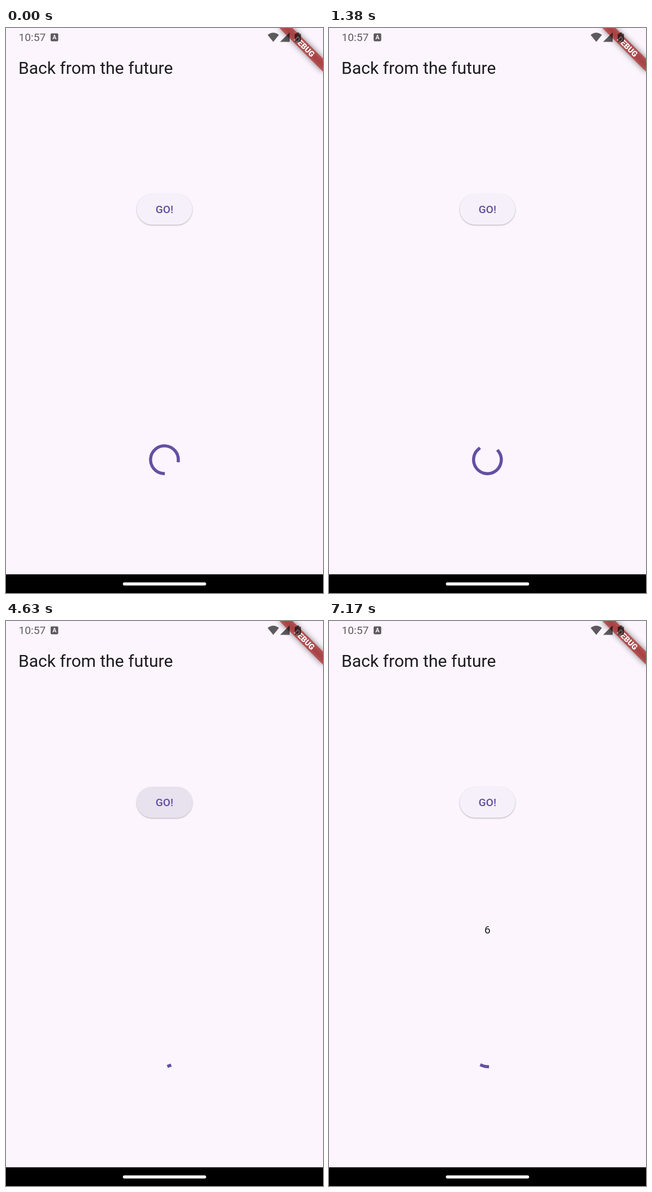
An HTML page for the animation above (7.21 s loop, 561 by 998 pixels).

```html
<!DOCTYPE html>
<html lang="en">
<head>
<meta charset="utf-8">
<title>Back from the future</title>
<style>
  html, body { margin: 0; width: 100%; height: 100%; overflow: hidden; background: #fcf5fd; }
  svg { display: block; width: 100%; height: 100%; font-family: Roboto, sans-serif; }
  #button { filter: drop-shadow(0 1.4px 1.2px rgba(0, 0, 0, .3)); }
  #shade { filter: blur(5.4px); }
</style>
</head>
<body>
<svg viewBox="0 0 561 998">
  <rect width="561" height="998" fill="#fcf5fd"/>
  <text x="22" y="80.5" font-size="30" fill="#1c1b20">Back from the future</text>

  <g id="button">
    <rect x="231.4" y="293" width="98.2" height="54.6" rx="27.3" fill="#f5f0f9"/>
    <rect id="press" x="231.4" y="293" width="98.2" height="54.6" rx="27.3" fill="#e8e2ee"/>
  </g>
  <text x="280.5" y="327.3" font-size="19.1" font-weight="500" letter-spacing=".14"
        text-anchor="middle" fill="#634da0">GO!</text>
  <text id="result" x="280.4" y="552.3" font-size="19.1" text-anchor="middle" fill="#1c1b20">6</text>
  <path id="arc" fill="none" stroke="#644fa2" stroke-width="5.46" stroke-linecap="square"/>

  <g transform="translate(561) rotate(45)">
    <rect id="shade" x="-54.6" y="38.2" width="109.2" height="16.4" fill="#000" fill-opacity=".5"/>
    <rect x="-54.6" y="38.2" width="109.2" height="16.4" fill="#b71c1c" fill-opacity=".627"/>
    <text y="51.3" font-size="13.9" font-weight="900" text-anchor="middle" fill="#fff">DEBUG</text>
  </g>

  <!-- status bar, drawn over the ribbon -->
  <g fill="#000" fill-opacity=".63">
    <text x="22.6" y="23.3" font-size="19.1">10:57</text>
    <path d="M463 12.2Q473 4.2 483 12.2L473 24.4Z"/>
    <path d="M485 24.4H502V7.8Z"/>
    <path d="M511 10.2H514.2V8H518.8V10.2H522V24.8H511Z"/>
    <rect x="79" y="9.6" width="13.4" height="13.8" rx="1.8"/>
  </g>
  <text x="85.7" y="20.4" font-size="10.5" font-weight="700" text-anchor="middle" fill="#fcf5fd">A</text>

  <rect y="965" width="561" height="33" fill="#000"/>
  <rect x="206.8" y="979.2" width="147.4" height="5.6" rx="2.8" fill="#f6f6f6"/>
</svg>
<script>
const LOOP = 7210, CX = 280.4, CY = 762.6, R = 24.55;
const $ = id => document.getElementById(id);
const clamp = x => Math.min(1, Math.max(0, x));

// cubic-bezier(.4, 0, .2, 1)
function ease(x) {
  let lo = 0, hi = 1, u;
  for (let i = 0; i < 24; i++) {
    u = (lo + hi) / 2;
    const v = 1 - u;
    if (1.2 * u * v * v + 0.6 * u * u * v + u * u * u < x) lo = u; else hi = u;
  }
  return u * u * (3 - 2 * u);
}

// The spinner hangs briefly when the button is pressed, then catches up.
const spinTime = t => t < 2420 ? t + 25 : t < 2740 ? 2445 : t;

function drawSpinner(t) {
  const phase = (t / 1333 + 0.443) % 1;
  const turn = t / 2222 + 0.386;
  const head = ease(clamp(phase * 2));
  const tail = ease(clamp(phase * 2 - 1));
  const start = Math.PI * (-0.5 + 1.5 * tail + 2 * turn + 0.5 * phase);
  const sweep = Math.max(1.5 * Math.PI * (head - tail), 0.005);
  const at = a => `${(CX + R * Math.cos(a)).toFixed(3)} ${(CY + R * Math.sin(a)).toFixed(3)}`;
  $('arc').setAttribute('d',
    `M${at(start)}A${R} ${R} 0 ${+(sweep > Math.PI)} 1 ${at(start + sweep)}`);
}

function draw(now) {
  const t = now % LOOP;
  drawSpinner(spinTime(t));
  $('press').setAttribute('opacity', clamp((t - 2300) / 150) * clamp((4850 - t) / 200));
  $('result').setAttribute('visibility', t < 5600 ? 'hidden' : 'visible');
}

const begin = performance.now();
function tick() {
  draw(performance.now() - begin);
  requestAnimationFrame(tick);
}
tick();
</script>
</body>
</html>
```
